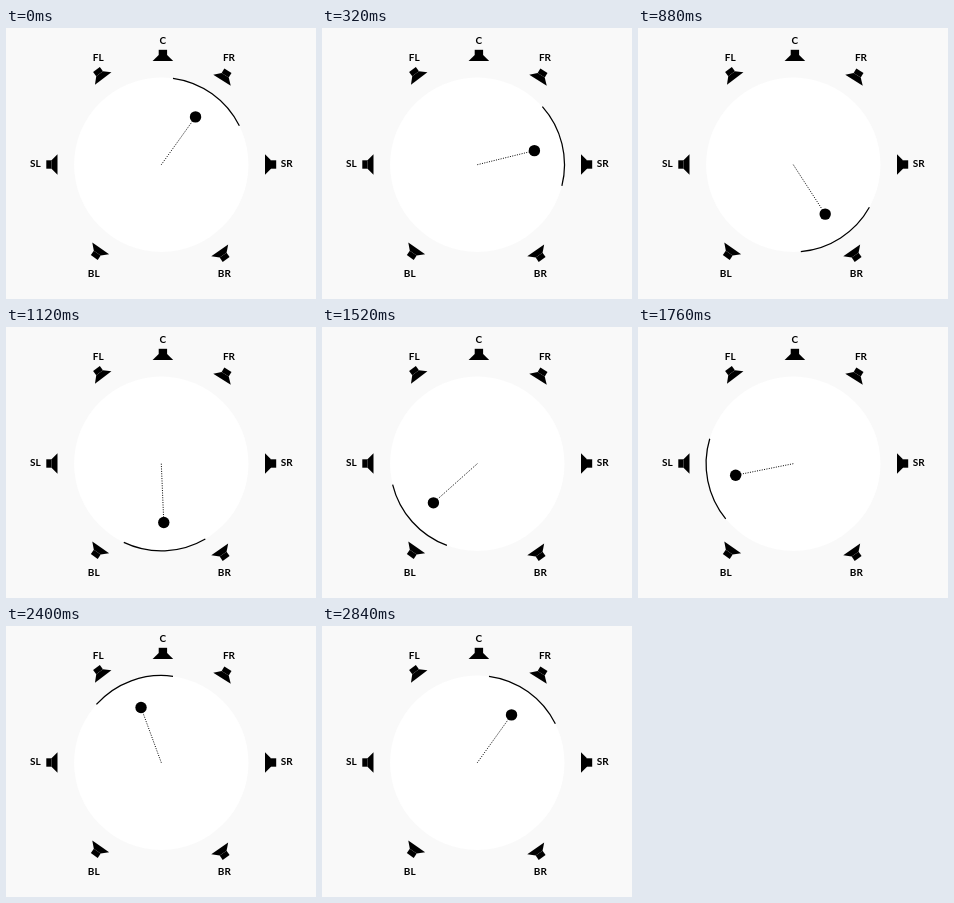
Animation, 310 px wide and 271 px high, one loop 3880 ms. Source, as an HTML page with a canvas:

```html
<!DOCTYPE html>
<html lang="en">
<head>
<meta charset="utf-8">
<title>Surround panner</title>
<style>
  html, body { margin: 0; width: 100%; height: 100%; overflow: hidden; background: #f9f9f9; }
  canvas { display: block; }
</style>
</head>
<body>
<canvas id="stage" width="310" height="271"></canvas>
<script>
const ctx = document.getElementById('stage').getContext('2d');

const LOOP = 3880, SWEEP = 2840, TICK = 40;
const CX = 155.3, CY = 136.7, RADIUS = 87.2;
const DOT_ORBIT = 58.8, DOT_SIZE = 5.7;
const START = 35.6, HALF_SPAN = 27.9;
const rad = deg => deg * Math.PI / 180;

// x, y: middle of the speaker's wide edge; turn: rotation from facing down
const speakers = [
  { name: 'C',  x: 156.9, y: 33,    turn: 0,   tx: 156.9, ty: 15.5 },
  { name: 'FR', x: 216,   y: 52.3,  turn: 32,  tx: 223,   ty: 33 },
  { name: 'SR', x: 259,   y: 136.5, turn: 90,  tx: 280.7, ty: 139.2 },
  { name: 'BR', x: 213.7, y: 222.3, turn: 145, tx: 218.3, ty: 249.2 },
  { name: 'BL', x: 94.7,  y: 220.3, turn: 215, tx: 87.7,  ty: 249.2 },
  { name: 'SL', x: 51.5,  y: 136.5, turn: -90, tx: 29.3,  ty: 139.2 },
  { name: 'FL', x: 97.2,  y: 50.5,  turn: -37, tx: 92.3,  ty: 33 }
];

function drawSpeaker({ name, x, y, turn, tx, ty }) {
  ctx.save();
  ctx.translate(x, y);
  ctx.rotate(rad(turn));
  ctx.fillRect(-4.2, -11.2, 8.4, 5.2);
  ctx.beginPath();
  ctx.moveTo(-4.2, -6);
  ctx.lineTo(4.2, -6);
  ctx.lineTo(10.3, 0);
  ctx.lineTo(-10.3, 0);
  ctx.fill();
  ctx.restore();
  ctx.fillText(name, tx, ty);
}

function disc(x, y, r, color) {
  ctx.fillStyle = color;
  ctx.beginPath();
  ctx.arc(x, y, r, 0, Math.PI * 2);
  ctx.fill();
}

function draw(time) {
  const elapsed = Math.min(Math.floor(time % LOOP / TICK) * TICK, SWEEP);
  const angle = rad(START + 360 * elapsed / SWEEP - 90);
  const x = CX + DOT_ORBIT * Math.cos(angle);
  const y = CY + DOT_ORBIT * Math.sin(angle);

  ctx.fillStyle = '#f9f9f9';
  ctx.fillRect(0, 0, 310, 271);
  disc(CX, CY, RADIUS, '#fff');

  ctx.fillStyle = ctx.strokeStyle = '#000';
  ctx.font = 'bold 10px Lato, "Open Sans", sans-serif';
  ctx.textAlign = 'center';
  speakers.forEach(drawSpeaker);

  ctx.lineWidth = 1.25;
  ctx.beginPath();
  ctx.arc(CX, CY, RADIUS, angle - rad(HALF_SPAN), angle + rad(HALF_SPAN));
  ctx.stroke();

  ctx.lineWidth = 1;
  ctx.setLineDash([1, 1.4]);
  ctx.beginPath();
  ctx.moveTo(CX, CY);
  ctx.lineTo(x, y);
  ctx.stroke();
  ctx.setLineDash([]);
  disc(x, y, DOT_SIZE, '#000');
}

let origin;
function frame(now) {
  origin ??= now;
  draw(Math.max(0, now - origin));
  requestAnimationFrame(frame);
}
draw(0);
requestAnimationFrame(frame);
</script>
</body>
</html>
```
